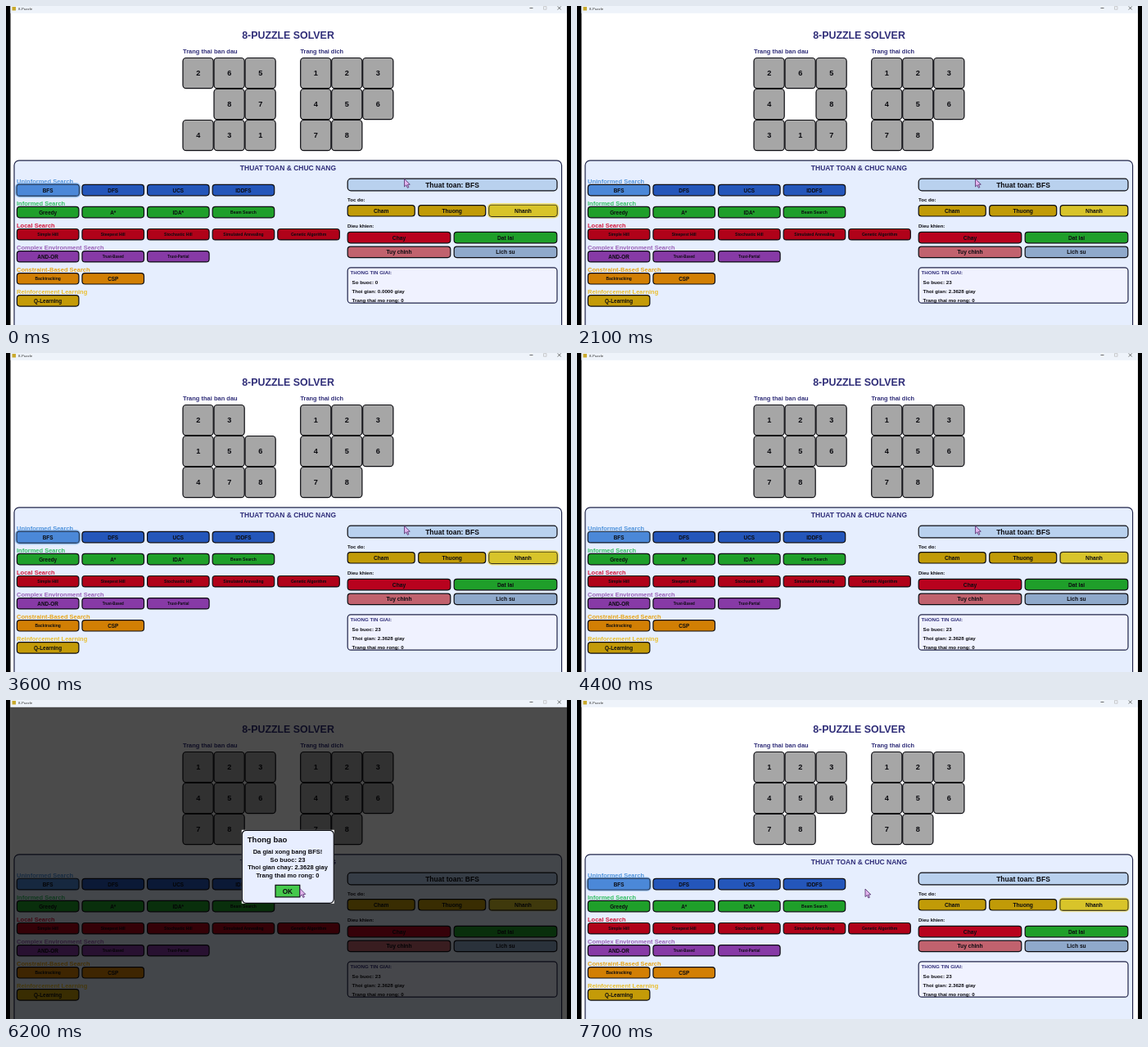
Animation, 690 px wide and 390 px high, one loop 7.8 s. Source, as an HTML page:

```html
<!DOCTYPE html>
<html lang="vi">
<head>
<meta charset="utf-8">
<title>8-Puzzle</title>
<style>
html, body { margin: 0; width: 100%; height: 100%; overflow: hidden; background: #000; }
svg { display: block; width: 690px; height: 390px; }
text { font-family: "Liberation Sans", Arial, sans-serif; font-weight: bold; }
</style>
</head>
<body>
<svg id="stage" viewBox="0 0 690 390"></svg>
<script>
const LOOP = 7800, STEP = 100;
const SOLVED_AT = 1390, MOVE_MS = 130;
const DIALOG = [4500, 7700];
const HELD = [400, 3700, 4000, 4200];
const START = "265087431", GOAL = "123456780";
const MOVES = "DRRULDLURDRUULDRULLDDRR";
const SHIFT = { U: -3, D: 3, L: -1, R: 1 };
const INK = "#0b0b10", NAVY = "#2f2d78";
const stage = document.getElementById("stage");

function add(tag, attrs, parent = stage) {
  const el = document.createElementNS("http://www.w3.org/2000/svg", tag);
  for (const key in attrs) el.setAttribute(key, attrs[key]);
  parent.appendChild(el);
  return el;
}

function box(x, y, width, height, fill, rx = 0, stroke = "none", parent = stage) {
  return add("rect", { x, y, width, height, fill, rx, stroke, "stroke-width": 1.2 }, parent);
}

// y is the vertical middle of the capitals
function label(str, x, y, size, fill = INK, anchor = "start", parent = stage) {
  const el = add("text", { x, y: y + size * 0.36, "font-size": size, fill, "text-anchor": anchor }, parent);
  el.textContent = str;
  return el;
}

function button(str, x, y, w, fill, size = 6.4) {
  const rect = box(x, y, w, 13.4, fill, 3.5, INK);
  label(str, x + w / 2, y + 6.8, size, INK, "middle");
  return rect;
}

function grid(x0, y0) {
  return Array.from({ length: 9 }, (_, i) => {
    const x = x0 + (i % 3) * 38, y = y0 + Math.floor(i / 3) * 38;
    const g = add("g", {});
    box(x, y, 37.2, 37.2, "#a6a6a6", 4, INK, g);
    return { g, text: label("", x + 18.7, y + 18.6, 9.2, INK, "middle", g) };
  });
}

function showBoard(cells, board) {
  cells.forEach(({ g, text }, i) => {
    g.style.display = board[i] === "0" ? "none" : "";
    text.textContent = board[i];
  });
}

// every board from start to finish
const boards = [START];
for (const m of MOVES) {
  const b = [...boards[boards.length - 1]];
  const from = b.indexOf("0"), to = from + SHIFT[m];
  [b[from], b[to]] = [b[to], b[from]];
  boards.push(b.join(""));
}

// window
box(5.5, 0, 679.5, 390, "#fff");
box(5.5, 0, 679.5, 8.8, "#eef3fa");
box(7.5, 1, 4.5, 4.5, "#c9a92c");
label("8-Puzzle", 15, 3, 4.4, "#333").style.fontWeight = "normal";
add("path", { d: "M639.5 2.5h4M673.7 .5l4 4m0-4l-4 4", stroke: "#333", "stroke-width": 0.7 });
add("path", { d: "M656.5 .7h3.5v3.5h-3.5z", stroke: "#bbb", "stroke-width": 0.7, fill: "none" });

label("8-PUZZLE SOLVER", 344.5, 35.5, 12.4, NAVY, "middle");
label("Trang thai ban dau", 216, 55, 7.5, NAVY);
label("Trang thai dich", 359.5, 55, 7.4, NAVY);
const puzzle = grid(216, 63.5);
showBoard(grid(359.7, 63.5), GOAL);

// panel
box(10, 188.8, 668.6, 220, "#e6eefe", 6, "#22264a");
label("THUAT TOAN & CHUC NANG", 344.5, 197.5, 8.5, NAVY, "middle");

const groups = [
  ["Uninformed Search", "#4f93dc", "#2456ba", ["BFS", "DFS", "UCS", "IDDFS"]],
  ["Informed Search", "#35c065", "#1f9f2a", ["Greedy", "A*", "IDA*", "Beam Search"]],
  ["Local Search", "#d3183a", "#b00219", ["Simple Hill", "Steepest Hill", "Stochastic Hill", "Simulated Annealing", "Genetic Algorithm"]],
  ["Complex Environment Search", "#9a62b8", "#873aa6", ["AND-OR", "Trust-Based", "Trust-Partial"]],
  ["Constraint-Based Search", "#e6a417", "#d27f04", ["Backtracking", "CSP"]],
  ["Reinforcement Learning", "#e9be2c", "#c49b08", ["Q-Learning"]]
];
const pulsing = [];
groups.forEach(([title, ink, fill, names], row) => {
  const y = 218.4 + row * 27.05;
  label(title, 13, y - 4, 7.5, ink);
  names.forEach((name, i) => {
    const size = name.length < 11 ? 6.4 : name.startsWith("Trust") ? 4.5 : 5;
    const selected = name === "BFS";
    const rect = button(name, 13.4 + i * 79.6, y, 75.5, selected ? "#4b88d8" : fill, size);
    if (selected) pulsing.push({ rect, x: 13.4, y, w: 75.5, glow: "#7db2f0" });
  });
});

box(417.2, 211.2, 255.8, 14.6, "#b9d1ee", 4, INK);
label("Thuat toan: BFS", 545, 218.5, 8.5, INK, "middle");
label("Toc do:", 417, 237, 6.1);
button("Cham", 417.2, 243.6, 82, "#c19b07", 6.7);
button("Thuong", 503.7, 243.6, 82, "#c19b07", 6.7);
const fast = button("Nhanh", 590.2, 243.6, 82.6, "#d8c42a", 6.7);
pulsing.push({ rect: fast, x: 590.2, y: 243.6, w: 82.6, glow: "#f5e05a" });
label("Dieu khien:", 417, 269, 6);
button("Chay", 417.2, 276.4, 125.6, "#b8021e", 6.7);
button("Dat lai", 547.2, 276.4, 125.6, "#1f9f2a", 6.7);
button("Tuy chinh", 417.2, 294.2, 125.6, "#c1626e", 6.7);
button("Lich su", 547.2, 294.2, 125.6, "#8fa9cb", 6.7);

box(417.2, 319.8, 255.8, 43.4, "#f0f2ff", 4, "#22264a");
label("THONG TIN GIAI:", 420.5, 326, 6.2, NAVY);
const stepsText = label("", 422.5, 337.6, 6.2);
const timeText = label("", 422.5, 349, 6.2);
label("Trang thai mo rong: 0", 422.5, 360, 6.2);

// soft rings around the selected buttons
for (const p of pulsing) {
  p.ring = add("rect", { rx: 5, fill: "none", stroke: p.glow, "stroke-width": 1.8 });
}

// message box
const dialog = add("g", {});
box(5.5, 8.8, 679.5, 381.2, "rgba(0,0,0,.706)", 0, "none", dialog);
box(287.8, 158.8, 113, 90, "#fff", 0, "none", dialog);
box(288.3, 159.3, 112, 89, "#e8eeff", 5, INK, dialog);
label("Thong bao", 294.8, 170.5, 9.5, INK, "start", dialog);
["Da giai xong bang BFS!", "So buoc: 23", "Thoi gian chay: 2.3628 giay", "Trang thai mo rong: 0"]
  .forEach((s, i) => label(s, 344, 185.2 + i * 9.6, 7.55, INK, "middle", dialog));
box(329, 226.3, 29.8, 14.6, "#45c94c", 0, INK, dialog);
label("OK", 343.9, 233.7, 8.2, INK, "middle", dialog);

const cursor = add("path", {
  d: "M0 0V9.6L2.3 7.6L3.9 11L5.4 10.3L3.9 7.1L6.8 6.9Z",
  fill: "#e3b4ee", stroke: "#4b2a66", "stroke-width": 0.8, "stroke-linejoin": "round"
});

// [ms, x, y]
const trail = [[5200, 486.5, 211.3], [6000, 367.5, 227], [6200, 359, 230.5], [6400, 339, 231], [6500, 352, 231]];
function cursorAt(t) {
  if (t <= trail[0][0]) return trail[0].slice(1);
  for (let i = 1; i < trail.length; i++) {
    const [t0, x0, y0] = trail[i - 1], [t1, x1, y1] = trail[i];
    if (t > t1) continue;
    let k = (t - t0) / (t1 - t0);
    if (i === 1) k = k * k * (3 - 2 * k);
    return [x0 + (x1 - x0) * k, y0 + (y1 - y0) * k];
  }
  return trail[trail.length - 1].slice(1);
}

function render(now) {
  let t = Math.floor((now % LOOP) / STEP) * STEP;
  if (HELD.includes(t)) t -= STEP;
  const open = t >= DIALOG[0] && t < DIALOG[1];

  const n = Math.floor((t - SOLVED_AT) / MOVE_MS);
  showBoard(puzzle, boards[Math.max(0, Math.min(MOVES.length, n))]);
  const solved = t >= SOLVED_AT;
  stepsText.textContent = "So buoc: " + (solved ? MOVES.length : 0);
  timeText.textContent = "Thoi gian: " + (solved ? "2.3628" : "0.0000") + " giay";

  const beat = open ? DIALOG[0] - STEP : t;
  const pulse = (1 + Math.cos(beat / 600 * 2 * Math.PI)) / 2;
  for (const { rect, ring, x, y, w } of pulsing) {
    const place = (el, d) => {
      el.setAttribute("x", x - d);
      el.setAttribute("y", y - d);
      el.setAttribute("width", w + 2 * d);
      el.setAttribute("height", 13.4 + 2 * d);
    };
    place(rect, pulse * 0.6);
    place(ring, 0.6 + pulse);
    ring.setAttribute("opacity", pulse * 0.75);
  }

  dialog.style.display = open ? "" : "none";
  cursor.setAttribute("transform", `translate(${cursorAt(t)})`);
}

function tick() {
  render(performance.now());
  requestAnimationFrame(tick);
}
tick();
</script>
</body>
</html>
```
